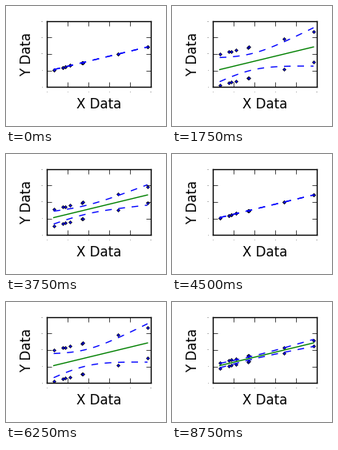
Recreate the animation shown at these times as a matplotlib script. Size 200 by 150 pixels, loop 9 s.

```python
import numpy as np
import matplotlib.pyplot as plt
from matplotlib.animation import FuncAnimation

plt.style.use("classic")
plt.rcParams["font.family"] = "DejaVu Sans"

W, H, DPI = 200, 150, 100
FRAMES, INTERVAL = 36, 250
SPREAD = 5.0
T_VALUE = 2.145  # 95 %, 14 degrees of freedom

x = np.array([0.67, 1.58, 1.81, 2.27, 3.38, 3.50, 6.82, 9.69])
xs = np.linspace(x.min(), x.max(), 100)


def model(v):
    return 4.73 + 0.766 * v


# Half-width of the confidence band for unit residuals
sxx = 2 * np.sum((x - x.mean()) ** 2)
half = T_VALUE * np.sqrt(1 / (2 * x.size) + (xs - x.mean()) ** 2 / sxx)

fig = plt.figure(figsize=(W / DPI, H / DPI), dpi=DPI, facecolor="white")
ax = fig.add_axes([50.9 / W, 49 / H, 130 / W, 82 / H])
ax.set_xlim(0, 10)
ax.set_ylim(0, 20)
ax.set_xticks(range(0, 11, 2))
ax.set_yticks(range(0, 21, 5))
ax.tick_params(labelsize=1)

fig.text(116.3 / W, 22 / H, "X Data", size=12, ha="center", va="baseline")
fig.text(35 / W, 90 / H, "Y Data", size=12, rotation=90,
         ha="right", va="center")

dots, = ax.plot([], [], "D", color="b", ms=2, mec="k", mew=0.5)
fit, = ax.plot(xs, model(xs), "g-")
upper, = ax.plot([], [], "b--")
lower, = ax.plot([], [], "b--")


def update(i):
    d = SPREAD * abs(np.sin(2 * np.pi * i / FRAMES))
    dots.set_data(np.tile(x, 2), np.r_[model(x) + d, model(x) - d])
    upper.set_data(xs, model(xs) + d * half)
    lower.set_data(xs, model(xs) - d * half)
    fit.set_visible(d > 1e-9)
    return dots, fit, upper, lower


anim = FuncAnimation(fig, update, frames=FRAMES, interval=INTERVAL,
                     repeat=True, repeat_delay=0)
plt.show()
```
